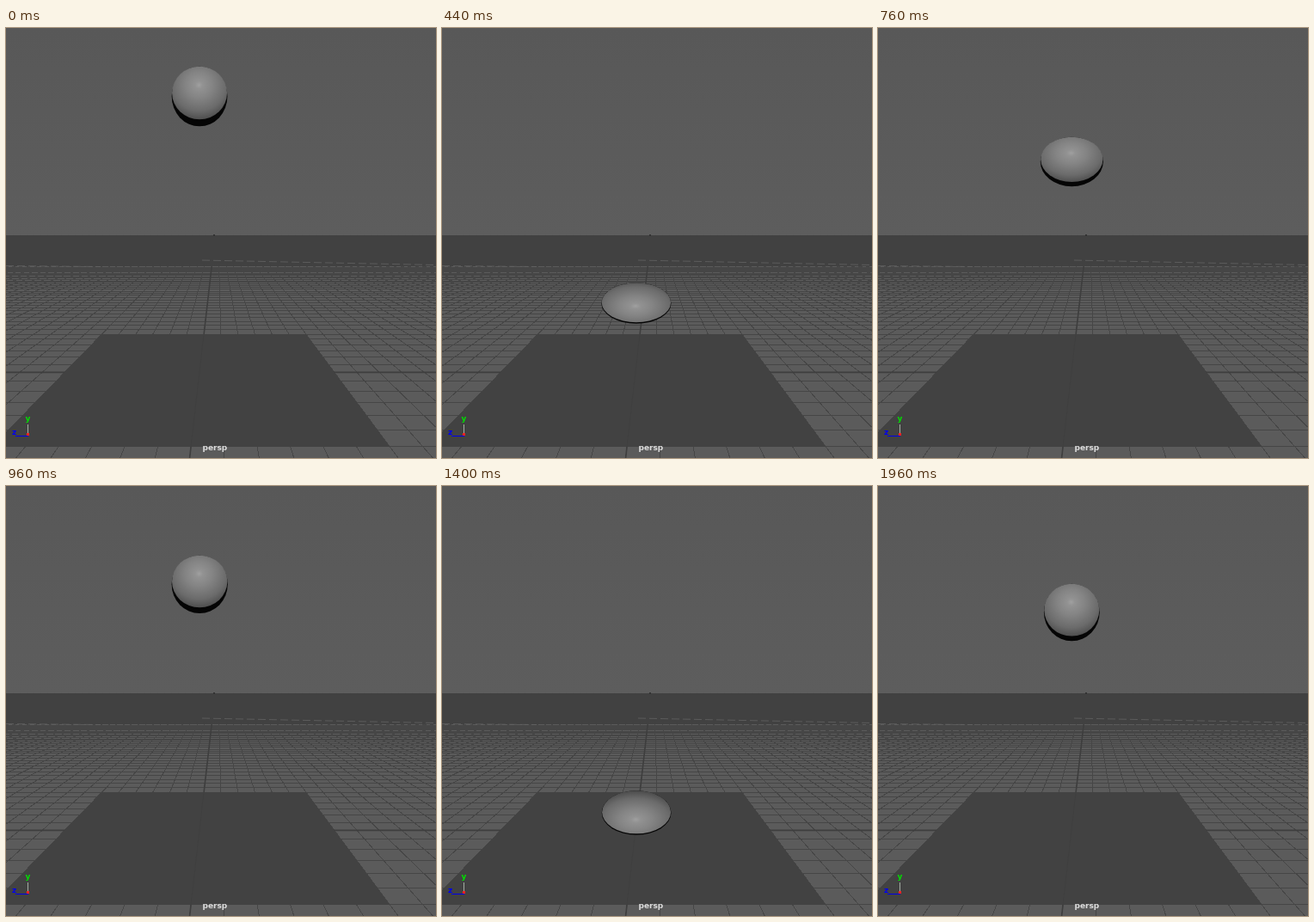
An HTML page that plays this animation: 500x500 px, repeating every 2000 ms.

```html
<!DOCTYPE html>
<html lang="en">
<head>
<meta charset="utf-8">
<title>Bouncing ball</title>
<style>
  html, body { margin: 0; width: 100%; height: 100%; overflow: hidden; background: #5a5a5a; }
  svg { display: block; width: 100vw; height: 100vh; }
  text { font: bold 9px "DejaVu Sans", sans-serif; }
</style>
</head>
<body>
<svg viewBox="0 0 500 500">
  <defs>
    <linearGradient id="sky" x2="0" y2="1">
      <stop stop-color="#585858"/><stop offset="1" stop-color="#5d5d5d"/>
    </linearGradient>
    <radialGradient id="shade" cx=".49" cy=".35" r=".7">
      <stop stop-color="#a0a0a0"/>
      <stop offset=".1" stop-color="#929292"/>
      <stop offset=".35" stop-color="#848484"/>
      <stop offset=".7" stop-color="#6b6b6b"/>
      <stop offset="1" stop-color="#464646"/>
    </radialGradient>
  </defs>
  <rect width="500" height="241" fill="url(#sky)"/>
  <rect y="241" width="500" height="259" fill="#5b5b5b"/>
  <path id="grid" fill="none" stroke="#464646" shape-rendering="crispEdges"/>
  <path id="axes" fill="none" stroke="#3e3e3e" stroke-width="1.6"/>
  <rect y="241" width="500" height="36" fill="#414141"/>
  <rect x="241" y="240" width="2" height="2" fill="#333"/>
  <path d="M228 270L350 272.5L500 275.5M0 276.5L110 277.5" fill="none" stroke="#626262" stroke-width=".8" stroke-dasharray="9 4"/>
  <path id="floor" fill="#424242"/>
  <path d="M230 356L215 487" stroke="#3e3e3e" stroke-width="1" opacity=".6"/>
  <path d="M25.5 461V472" stroke="#a4aca4"/>
  <path d="M11 474.5H26" stroke="#0000e6"/>
  <rect x="24" y="471" width="3" height="3" fill="#f22"/>
  <text x="22.5" y="457" fill="#00e000">y</text>
  <text x="7" y="473" fill="#0000f0">z</text>
  <ellipse id="rim" fill="#050505"/>
  <ellipse id="ball" fill="url(#shade)"/>
  <text x="228.5" y="491" fill="#dcdcdc">persp</text>
</svg>
<script>
const $ = id => document.getElementById(id);
const LOOP = 2000, STEP = 40;

// Perspective ground: both line families follow from one vanishing point.
const vanish = { x: 246, y: 218 };
const rowY = n => vanish.y + 1 / (0.005482 + n * 0.000294);
const colX = (n, y) => vanish.x + (n * 0.1433 - 0.115) * (y - vanish.y);
const row = n => `M0 ${rowY(n)}H500`;
const column = n => `M${colX(n, 277)} 277L${colX(n, 500)} 500`;

function drawGround() {
  let d = '';
  for (let n = -6; n < 39; n++) d += row(n);
  for (let n = -31; n <= 32; n++) d += column(n);
  $('grid').setAttribute('d', d);
  $('axes').setAttribute('d', row(0) + column(0));
  const back = rowY(6), front = rowY(-6);
  $('floor').setAttribute('d',
    `M${colX(-6, back)} ${back}H${colX(6, back)}L${colX(6, front)} ${front}H${colX(-6, front)}Z`);
}

// time, height, speed arriving, speed leaving (if different)
const keys = [
  [0, 79.5, 0], [200, 126, 0.5], [440, 320, 1.25], [480, 380, 1.7, -1.3],
  [560, 286, -1.05], [760, 155.5, -0.36], [980, 114, 0], [1120, 125.5, 0.22],
  [1200, 153.5, 0.5], [1400, 380, 2, -0.95], [1600, 235, -0.5],
  [1680, 200.5, -0.38], [1960, 147, 0]
];

function heightAt(t) {
  const i = Math.max(1, keys.findIndex(k => k[0] >= t));
  const [t0, y0, vin, v0 = vin] = keys[i - 1];
  const [t1, y1, v1] = keys[i];
  const span = t1 - t0, u = (t - t0) / span, w = 1 - u;
  return y0 * w * w * (1 + 2 * u) + y1 * u * u * (3 - 2 * u)
    + span * u * w * (v0 * w - v1 * u);
}

function squashAt(t) {
  const u = 1 - Math.abs((t % 980) / 490 - 1);
  return 0.7 * u * u * (3 - 2 * u) + 0.3 * Math.sin(u * Math.PI / 2);
}

function setEllipse(id, cx, cy, rx, ry) {
  Object.entries({ cx, cy, rx, ry }).forEach(([k, v]) => $(id).setAttribute(k, v));
}

function draw(t) {
  const y = heightAt(t), s = squashAt(t);
  const x = 225.2 + 0.0035 * (y - 120);
  const rx = 32.4 + 8.4 * s;
  const ry = (32.8 + 0.00014 * (y - 200) ** 2) * (1 - 0.2 * s - 0.13 * s * s);
  const shadow = Math.max(1.5, 8 - (y - 80) * 0.035);
  setEllipse('rim', x, y, rx, ry);
  setEllipse('ball', x, y - shadow / 2, rx - 0.4, ry - shadow / 2);
  $('shade').setAttribute('cy', 0.35 + Math.max(0, y - 150) * 0.0014);
}

function frame() {
  const t = performance.now() % LOOP;
  draw(Math.floor(t / STEP) * STEP);
  requestAnimationFrame(frame);
}

drawGround();
frame();
</script>
</body>
</html>
```
